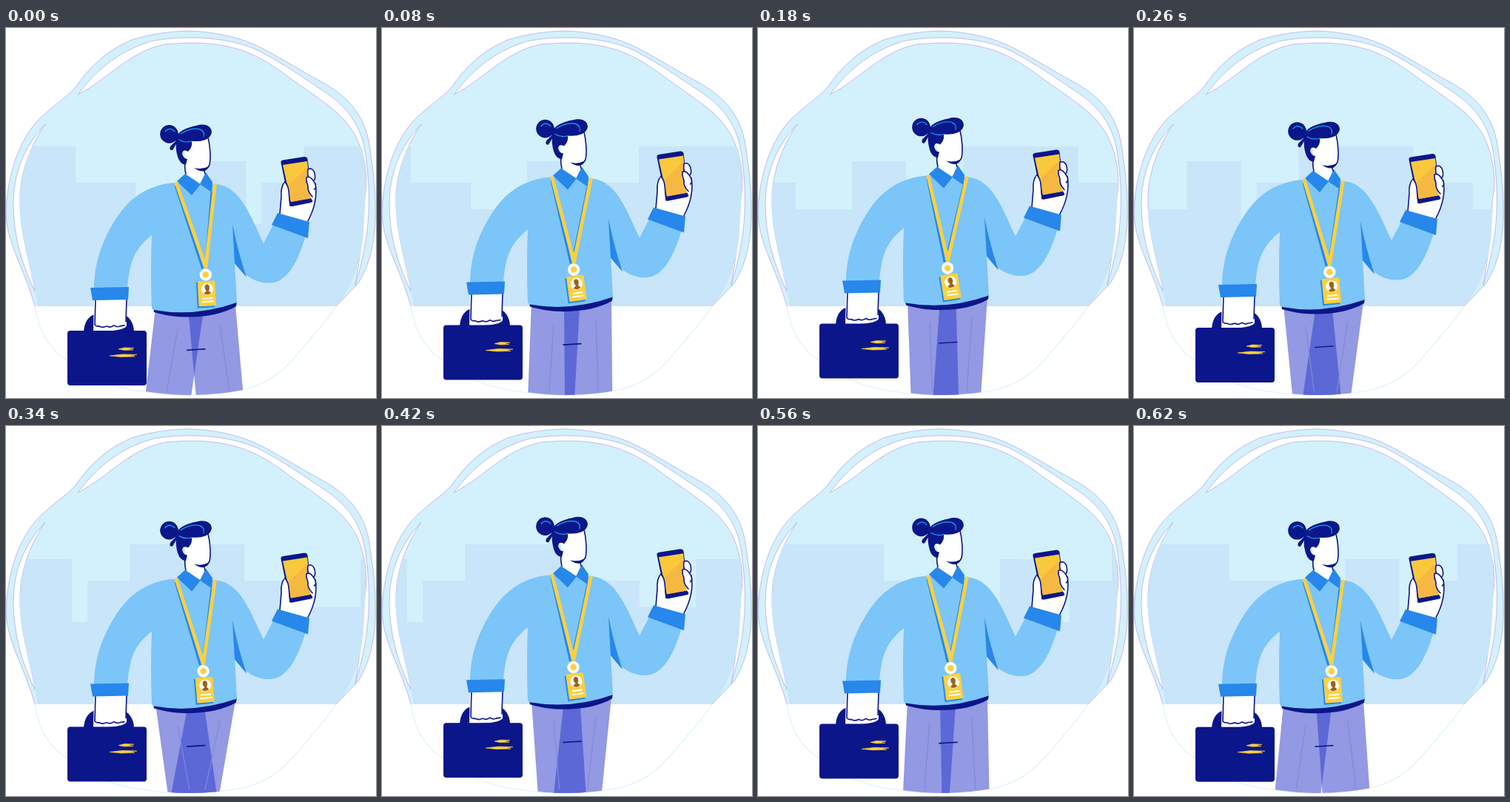
An HTML page that plays this animation: 500x500 px, repeating every 640 ms.

```html
<!DOCTYPE html>
<html lang="en">
<head>
<meta charset="utf-8">
<title>Walking to work</title>
<style>
  html, body { margin: 0; width: 100%; height: 100%; overflow: hidden; background: #fff; }
  svg { display: block; width: 100vw; height: 100vh; }
  .sky { fill: #d3f1fc; }
  .town { fill: #c8e5fa; }
  .navy { fill: #0a1689; }
  .blue { fill: #2787ea; }
  .shirt { fill: #7bc5f9; }
  .gold { fill: #fdd03f; }
  .white { fill: #fff; }
  .leg { fill: #9399e2; }
  .line { fill: none; stroke: #0a1689; stroke-width: 1.6; stroke-linecap: round; stroke-linejoin: round; }
  .finger { fill: #fff; }
  .edge { stroke: #b8abe9; stroke-width: .8; }
  .rim { fill: none; stroke: #dcf3fd; stroke-width: 1.2; }
  .shine { fill: none; stroke: #12a5ee; stroke-width: 1.2; stroke-linecap: round; }
  .crease { fill: none; stroke: #828ad6; stroke-width: 1.2; }
  .strap { fill: none; stroke: #fdd03f; stroke-width: 4.8; }
  .shade { fill: none; stroke: #2787ea; stroke-width: 3; }
</style>
</head>
<body>
<svg viewBox="0 0 500 500">
  <defs>
    <path id="bowl" d="M97 90C140 68 165 30 215 22C290 13 330 28 375 61C420 93 465 108 480 160C490 190 485 240 483 275C480 325 462 358 446 376L43 376C37 330 15 275 19 225C22 190 33 160 48 138C60 120 80 105 97 90Z"/>
    <clipPath id="inBowl"><use href="#bowl"/></clipPath>
    <clipPath id="floor"><path d="M0 0H500V440L321 489Q255 502 188 491L0 440Z"/></clipPath>
    <clipPath id="overlap"><polygon id="legClip"/></clipPath>
  </defs>

  <path class="sky edge" d="M39 376C25 325 0 290 0 248C2 200 16 152 46 122C62 106 82 94 94 80C113 52 137 30 170 16C195 8 225 4 250 4C280 5 312 12 335 22C365 36 395 56 425 72C464 93 487 120 492 165C497 195 500 230 499 258C498 292 491 321 476 345L446 376"/>
  <path class="white edge" d="M97 90C116 65 147 31 200 17C250 9 302 13 340 30C375 48 400 66 430 86C462 106 481 134 486 172C493 225 494 275 472 348C480 300 483 270 484 235C491 200 484 170 473 147C455 112 420 95 375 61C330 28 290 15 215 22C165 32 140 68 97 90Z"/>
  <path class="white edge" d="M53 130C25 160 10 195 10 238C10 285 24 325 39 356C34 320 18 280 19 228C20 190 36 155 53 130Z"/>
  <path class="rim" d="M39 376C46 418 62 436 85 451M115 470Q145 487 190 492Q250 502 321 489C370 478 392 442 414 417Q432 397 446 376"/>

  <g clip-path="url(#inBowl)"><path id="town" class="town"/></g>

  <g clip-path="url(#floor)">
    <polygon id="legA" class="leg"/>
    <polygon id="legB" class="leg"/>
    <polygon id="legMix" fill="#5c68d6" clip-path="url(#overlap)"/>
    <path id="creases" class="crease"/>
  </g>

  <g id="body">
    <path class="line" d="M245 435.500Q257 434.500 269 434"/>

    <path class="navy" d="M105 411C106 393 115 387 125 386H155C166 388 173 398 173 411Z"/>
    <path class="white" d="M119 362H163V402Q161 410 118 410Z"/>
    <path class="line" d="M121 366L120 401Q122 404 126 403Q130 406 136 403Q141 406 146 402Q150 405 154 403L160 402M163 366L162 397"/>
    <rect class="navy" x="83" y="409" width="107" height="74" rx="4"/>
    <path d="M152 434L160 432L173 432.500L165 434L172 435L160 435.500ZM140 443L157 441L177 441.500L168 443L174 444L155 444.500Z" fill="#fdd03f" stroke="#fdd03f" stroke-width=".6"/>

    <path class="navy" d="M199 379L312 369L311 376C285 392 235 395 200 384Z"/>
    <path class="shirt" d="M230 209C190 211 164 232 146 262C127 293 119 322 119 354H164C166 320 172 299 197 280Q195 330 197 379L200 381Q255 391 312 371L309 317C324 338 342 347 362 344C384 339 397 308 405 280L362 264L348 291C331 255 317 215 285 211Z"/>
    <path class="blue" d="M306 265Q313 301 325 337L309 318Z"/>
    <path class="blue" d="M114 351L166 350L165 367L117 368Z"/>

    <path class="white" d="M242 178L243 198L262 212L271 196L269 186Z"/>
    <path class="blue" d="M231 207L242 197L263 211L251 226ZM270 195L279 208L278 222L262 211Z"/>
    <path class="white" d="M240 152L272 146C277 160 277 176 275 184Q270 193 256 190L243 186Z"/>
    <path class="line" d="M273 148C276 160 277 176 275 185Q273 190 268 192M242 181Q241 188 243 197M268 193L269 197"/>
    <path class="navy" d="M254 189Q264 192 274 187Q269 199 254 189Z"/>
    <circle class="navy" cx="220.5" cy="143.5" r="12.3"/>
    <path class="navy" d="M230 146C236 138 246 134 257 132C270 128 278 133 278 141C276 152 262 154 251 153C252 160 249 164 246 167Q239 163 238 170Q240 177 245 177L243 185Q235 184 232 174Q229 164 230 157L225 165Q220 166 222 160L229 153Z"/>
    <path class="shine" d="M215 140Q221 133 228 140M236 143Q250 134 262 137Q269 140 267 147M234 151Q242 156 252 153"/>

    <path id="shade" class="shade"/>
    <path id="straps" class="strap"/>
    <g id="badge">
      <path class="blue" d="M-13.500 10H10V44.500H-13.500Z"/>
      <rect class="gold" x="-11.5" y="8.5" width="23.5" height="34" rx="1.5"/>
      <circle r="8.2" class="white"/>
      <circle r="4.3" class="gold"/>
      <circle class="white" cx="1" cy="19.5" r="8"/>
      <path d="M-2 15Q1 11 4 15Q5 19 3 22L6 25Q1 29-4 25L0 22Q-3 19-2 15Z" fill="#9a6416"/>
      <path d="M-6 32H8M-7 36.500H9" stroke="#fff" stroke-width="2"/>
    </g>

    <path class="white" d="M377 209C370 214 372 232 370 254L409 263C417 246 420 232 419 210L414 193L400 190Z"/>
    <path class="line" d="M377 208Q371 214 372 228L370 252M418 210C421 228 416 246 408 261"/>
    <path class="blue" d="M367 250L410 262L408 284L359 266Z"/>
    <path class="navy" d="M371.500 182Q371 179 374 178.500L403 174Q407 174 407.500 177L415 232Q415 235 412 236L387 241Q383 242 383 238Z"/>
    <path fill="#f9c83c" d="M374 185L407 180L413 230L385 235Z"/>
    <path fill="#f5b942" d="M408 188L379 215L385 235L413 230Z"/>
    <path class="white" d="M376 209Q381 212 382 222L383 241L372 246Z"/>
    <path class="line" d="M377 208Q382 213 382.500 225L384 240"/>
    <path class="finger line" style="fill:#fff" d="M408 191Q414 188 417 196Q419 205 415 207Q406 204 408 191Z"/>
    <path class="finger line" style="fill:#fff" d="M406 202Q411 199 417 209Q421 217 415 219Q405 214 406 202Z"/>
    <path class="white" d="M408 212Q412 211 416 218L415 235Q409 226 408 212Z"/>
    <path class="line" d="M408 213Q407 221 414 228"/>
  </g>
</svg>
<script>
const LOOP = 640;
const TILE = 463;
const SPEED = .6915;
const el = id => document.getElementById(id);

// [time, height of the step: 1 = lowest, 0 = highest]
const BOB = [[0, 1], [20, .8], [80, .33], [120, .16], [160, .03], [180, .13],
             [310, .95], [340, .79], [420, .29], [500, 0], [620, .79], [640, .95]];
// [time, closeness of the legs: 0 = apart, 1 = together]
const STRIDE = [[0, 0], [80, .29], [180, .6], [320, 1.03], [340, 1], [420, .74],
                [500, .44], [620, .07], [640, 0]];
// [left edge, roof] of each building within one tile
const ROOFS = [[0, 160], [155, 209], [236, 245], [312, 180], [385, 265], [406, 209]];

function sample(keys, t) {
  const i = Math.max(1, keys.findIndex(k => k[0] >= t));
  const [t0, a] = keys[i - 1], [t1, b] = keys[i];
  return a + (b - a) * (t - t0) / (t1 - t0);
}

const skyline = [0, 1, 2].map(n => ROOFS.map(([x, y]) => `H${x + n * TILE}V${y}`).join('')).join('');
el('town').setAttribute('d', `M0 376${skyline}H${3 * TILE}V376Z`);

function draw(t) {
  const bob = sample(BOB, t), near = sample(STRIDE, t);
  const dy = 11 * (bob - 1);

  el('town').setAttribute('transform', `translate(${-60 - SPEED * t} 0)`);
  el('body').setAttribute('transform', `translate(0 ${dy})`);

  const top = 378 + dy;
  const left = 188 + 31 * near, right = 321 - 33 * near;
  const legA = `202,${top} 267.5,${top} ${250 + 35 * near},498 ${left},498`;
  const legB = `246,${top} 310,${top - 4} ${right},498 ${257 - 34 * near},498`;
  el('legA').setAttribute('points', legA);
  el('legB').setAttribute('points', legB);
  el('legMix').setAttribute('points', legA);
  el('legClip').setAttribute('points', legB);
  el('creases').setAttribute('d',
    `M232 ${407 + dy}L${left + 29} 491M289 ${401 + dy}L${right - 19} 491`);

  const x = 254 + 16 * bob, y = 334 - .5 * bob;
  el('straps').setAttribute('d', `M229.500 208L${x + .5} ${y - 9}M282.500 210L${x} ${y - 9}`);
  el('shade').setAttribute('d', `M229 213L${x - 4} ${y - 8}M278 222L${x + 1} ${y - 24}`);
  el('badge').setAttribute('transform', `translate(${x} ${y}) rotate(${-10 + 7 * bob})`);
}

function tick() {
  draw(performance.now() % LOOP);
  requestAnimationFrame(tick);
}
tick();
</script>
</body>
</html>
```
